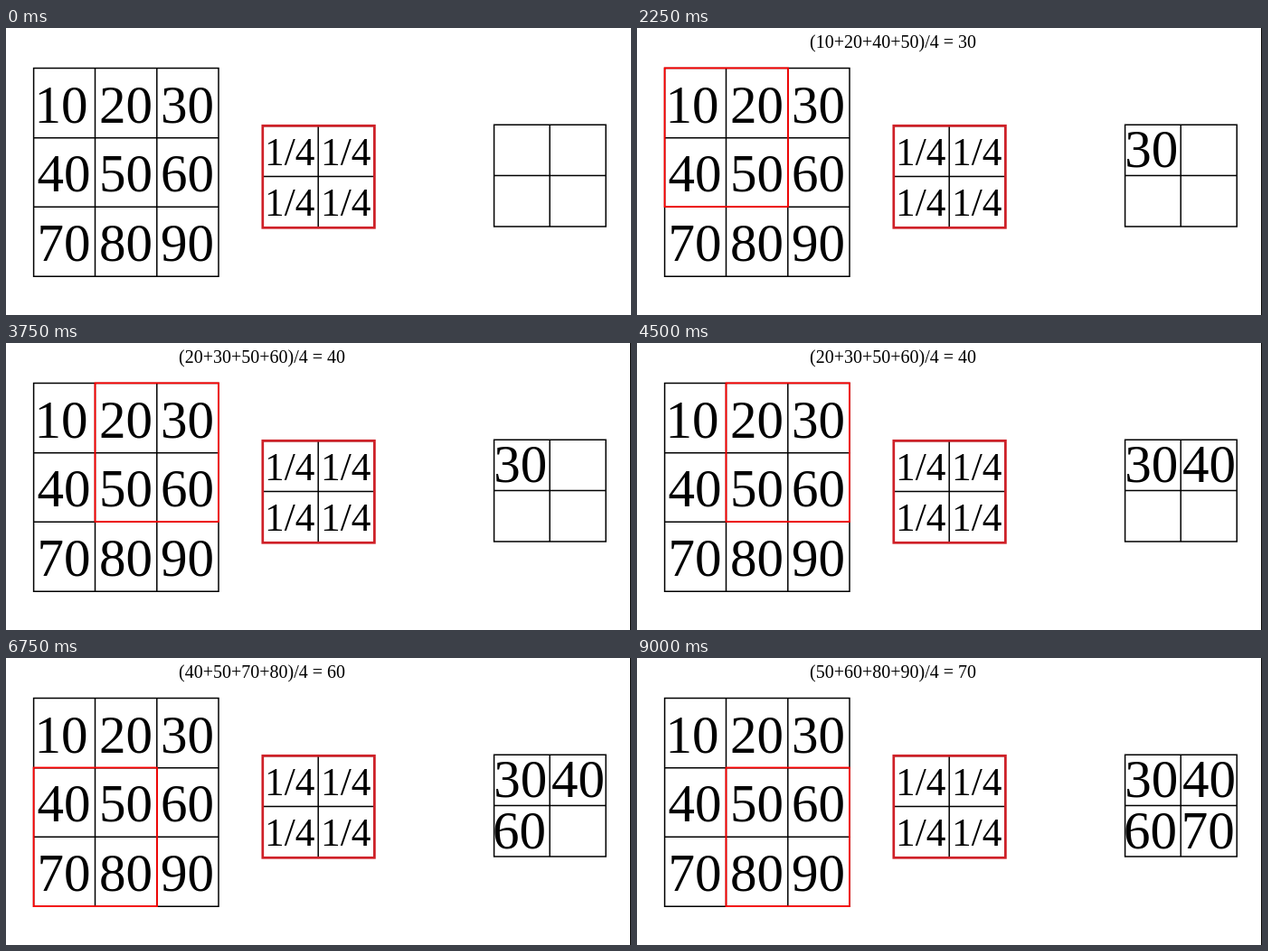
These frames come from a looping animation (691 by 318 pixels, 9750 ms). An HTML page:

```html
<!DOCTYPE html>
<html lang="en">
<head>
<meta charset="utf-8">
<title>Average pooling</title>
<style>
html, body { margin: 0; height: 100%; overflow: hidden; background: #fff; }
svg { display: block; width: 691px; height: 318px; }
text { font-family: "Liberation Serif", "Times New Roman", serif; white-space: pre; }
path { stroke: #000; stroke-width: 1.5; stroke-linecap: square; fill: none; }
rect { fill: none; }
</style>
</head>
<body>
<svg id="stage" viewBox="0 0 691 318"></svg>
<script>
const STEP = 750, STEPS = 13;
const stage = document.getElementById('stage');

function add(tag, attrs, content = '') {
  const el = document.createElementNS('http://www.w3.org/2000/svg', tag);
  for (const key in attrs) el.setAttribute(key, attrs[key]);
  el.textContent = content;
  return stage.appendChild(el);
}

const label = (x, y, size, content) => add('text', { x, y, 'font-size': size }, content);

function grid(xs, ys) {
  const d = xs.map(x => `M${x} ${ys[0]}V${ys.at(-1)}`)
    .concat(ys.map(y => `M${xs[0]} ${y}H${xs.at(-1)}`));
  add('path', { d: d.join('') });
}

const show = (el, on) => el.setAttribute('visibility', on ? 'visible' : 'hidden');

// Input matrix
const inX = [30.6, 98.5, 166.8, 235], inY = [44.6, 121.7, 198.3, 275.2];
grid(inX, inY);
const textX = [34.5, 103, 171];
for (let i = 0; i < 9; i++)
  label(i ? textX[i % 3] : 31.4, [104.5, 181.3, 258][i / 3 | 0], 59, (i + 1) * 10);

// Kernel
grid([284, 345.2, 407], [108.5, 164.6, 221]);
add('rect', { x: 283.8, y: 108.3, width: 123.6, height: 113, stroke: '#cf2027', 'stroke-width': 2.7 });
for (const y of [151.5, 207.7])
  for (const x of [286, 348]) label(x, y, 43.3, '1/4');

// Output matrix
grid([539.6, 601.2, 663.2], [107.2, 163.4, 220]);
const results = [
  label(539.3, 154, 59, 30), label(603, 154, 59, 40),
  label(538, 210.5, 59, 60), label(601.8, 210.5, 59, 70)
];

const formula = label(191, 21.5, 20);
const sliding = add('rect', { width: 136.4, height: 153.6, stroke: '#f00', 'stroke-width': 1.8 });
const edge = add('path', { d: 'M690.5 0V318', style: 'stroke-width:1' });

let shown = -1;
function frame(now) {
  const step = Math.floor(now / STEP) % STEPS;
  if (step !== shown) {
    shown = step;
    const pos = Math.max(0, Math.floor((step - 1) / 3)), phase = (step + 2) % 3;
    const col = pos % 2, row = pos >> 1;
    const first = 10 + col * 10 + row * 30;
    sliding.setAttribute('x', inX[col]);
    sliding.setAttribute('y', inY[row] - 0.2);
    formula.textContent =
      `(${[0, 10, 30, 40].map(n => first + n).join('+')})/4 = ${first + 20}`;
    show(sliding, step > 0);
    show(edge, step > 0);
    show(formula, step > 0 && phase > 0);
    results.forEach((el, i) => show(el, step >= 3 * i + 3));
  }
  requestAnimationFrame(frame);
}
frame(performance.now());
</script>
</body>
</html>
```
